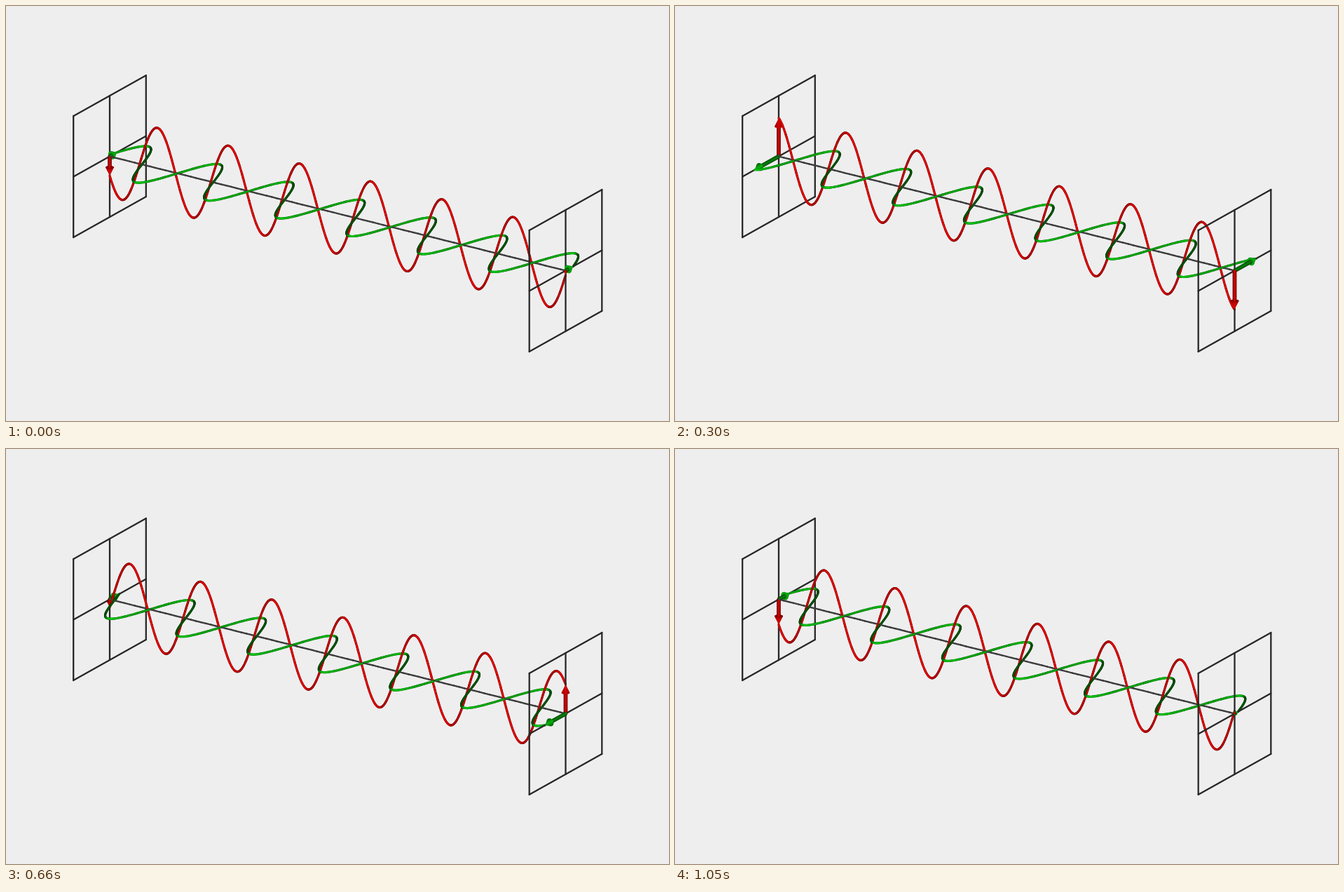
These frames come from a looping animation (946 px wide and 592 px high, 1.08 s). An HTML page with a canvas:

```html
<!DOCTYPE html>
<html lang="en">
<head>
<meta charset="utf-8">
<title>Plane wave</title>
<style>
html, body { margin: 0; width: 100%; height: 100%; overflow: hidden; background: #eee; }
canvas { display: block; }
</style>
</head>
<body>
<canvas id="stage" width="946" height="592"></canvas>
<script>
const ctx = document.getElementById('stage').getContext('2d');
const LOOP = 1080, STEP = 30;
const LENGTH = 650.5, WAVE = 101.6, K = 2 * Math.PI / WAVE;
const AMP = 2 / 3;              // field amplitude in half panel sizes
const UNIT = 93.3;              // half panel size in space
const RED = [228, 2, 2], GREEN = [8, 202, 16], GREY = [78, 78, 78];

// a: along the axis, u: across the panel, v: up
function project(a, u, v) {
  const ground = 214.5 + 0.2506 * a - 29 * u;
  return {
    x: 148 + a + 51.8 * u,
    y: ground - 86.5 * v,
    near: ground * 2.48 + 86.5 * v * 0.403
  };
}

// Brightness of a thin tube lit from the viewer
function tubeLight(da, du, dv) {
  const p = 1.2036 * da, q = UNIT * du, r = UNIT * dv;
  const c = (0.517 * p - 0.77 * q + 0.374 * r) / Math.hypot(p, q, r);
  return Math.sqrt(Math.max(0, 1 - c * c));
}

const shade = (c, f) => `rgb(${c.map(n => Math.round(Math.min(255, n * f))).join()})`;

function line(p, q, color, width) {
  ctx.strokeStyle = color;
  ctx.lineWidth = width;
  ctx.beginPath();
  ctx.moveTo(p.x, p.y);
  ctx.lineTo(q.x, q.y);
  ctx.stroke();
}

function fillPoly(points, style) {
  ctx.fillStyle = style;
  ctx.beginPath();
  points.forEach(p => ctx.lineTo(p.x, p.y));
  ctx.fill();
}

function hull(points) {
  const sorted = [...points].sort((p, q) => p.x - q.x || p.y - q.y);
  const half = list => {
    const out = [];
    for (const p of list) {
      while (out.length > 1) {
        const b = out[out.length - 1], a = out[out.length - 2];
        if ((b.x - a.x) * (p.y - a.y) - (b.y - a.y) * (p.x - a.x) > 0) break;
        out.pop();
      }
      out.push(p);
    }
    return out.slice(0, -1);
  };
  return [...half(sorted), ...half(sorted.reverse())];
}

function panel(a) {
  const seg = (u1, v1, u2, v2) =>
    line(project(a, u1, v1), project(a, u2, v2), '#272727', 2.3);
  for (const k of [-1, 0, 1]) {
    seg(-1, k, 1, k);
    seg(k, -1, k, 1);
  }
}

function addTube(parts, at, from, to, count, color, width) {
  const d = (to - from) / count;
  for (let i = 0; i < count; i++) {
    const s = from + i * d, A = at(s), B = at(s + d);
    const p = project(...A), q = project(...B);
    const f = tubeLight(B[0] - A[0], B[1] - A[1], B[2] - A[2]);
    const near = (p.near + q.near) / 2;
    parts.push({ p, q, near, color: shade(color, f * 0.72), width });
    parts.push({ p, q, near: near + 4, color: shade(color, f), width: width * 0.58 });
  }
}

function arrow(a, value, upright, color) {
  const size = Math.abs(value) * UNIT;
  if (size < 1.5) return;
  const dir = Math.sign(value);
  const scale = Math.min(1, size / 18);
  const headLen = 13 * scale, headR = 6 * scale, shaftR = Math.min(2.9, 1.5 + size * 0.1);
  const at = (d, across, other) => {
    const m = dir * d / UNIT, n = across / UNIT;
    return upright ? project(a + other * 0.83, n, m) : project(a + other * 0.83, m, n);
  };
  const ring = (d, r) => Array.from({ length: 24 }, (_, i) => {
    const w = i * Math.PI / 12;
    return at(d, r * Math.cos(w), r * Math.sin(w));
  });
  const light = upright ? 0.95 : 0.66;
  const tone = (r, edge, mid) => {
    const o = at(0, 0, 0), e = at(10, 0, 0);
    const len = Math.hypot(e.x - o.x, e.y - o.y);
    const nx = -(e.y - o.y) / len * r, ny = (e.x - o.x) / len * r;
    const g = ctx.createLinearGradient(o.x - nx, o.y - ny, o.x + nx, o.y + ny);
    g.addColorStop(0, shade(color, edge));
    g.addColorStop(0.5, shade(color, mid));
    g.addColorStop(1, shade(color, edge));
    return g;
  };
  const base = size - headLen;
  const shaft = () => {
    if (base > 0) {
      fillPoly(hull([...ring(0, shaftR), ...ring(base, shaftR)]),
        tone(shaftR, light * 0.5, light));
    }
  };
  const head = () => {
    fillPoly(hull([...ring(base, headR), at(size, 0, 0)]),
      tone(headR, light * 0.65, upright ? light : 0.88));
  };
  const faces = upright ? dir > 0 : dir < 0;
  if (faces) {
    shaft();
    head();
  } else {
    head();
    fillPoly(ring(base, headR), shade(color, upright ? 0.6 : 0.82));
    shaft();
  }
}

function arrows(a, e, b) {
  const up = () => arrow(a, e, true, RED);
  const side = () => arrow(a, b, false, GREEN);
  const order = b > 0 ? [side, up] : [up, side];
  order.forEach(f => f());
}

function draw(t) {
  const shift = t / LOOP * WAVE;
  const red = a => AMP * Math.cos(K * (a - 68.1 - shift));
  const green = a => AMP * Math.cos(K * (a - 20.6 - shift));

  ctx.fillStyle = '#eee';
  ctx.fillRect(0, 0, 946, 592);
  ctx.lineCap = 'round';

  panel(0);
  arrows(0, red(0), green(0));

  const parts = [];
  addTube(parts, a => [a, 0, 0], 0, LENGTH, 90, GREY, 2.3);
  addTube(parts, a => [a, 0, red(a)], 0, LENGTH, 520, RED, 3.2);
  addTube(parts, a => [a, green(a), 0], 0, LENGTH, 520, GREEN, 3.2);
  parts.sort((m, n) => m.near - n.near);
  parts.forEach(s => line(s.p, s.q, s.color, s.width));

  panel(LENGTH);
  arrows(LENGTH, red(LENGTH), green(LENGTH));
}

const start = performance.now();
let last = -1;
function tick() {
  const t = Math.floor(((performance.now() - start) % LOOP) / STEP) * STEP;
  if (t !== last) draw(last = t);
  requestAnimationFrame(tick);
}
tick();
</script>
</body>
</html>
```
